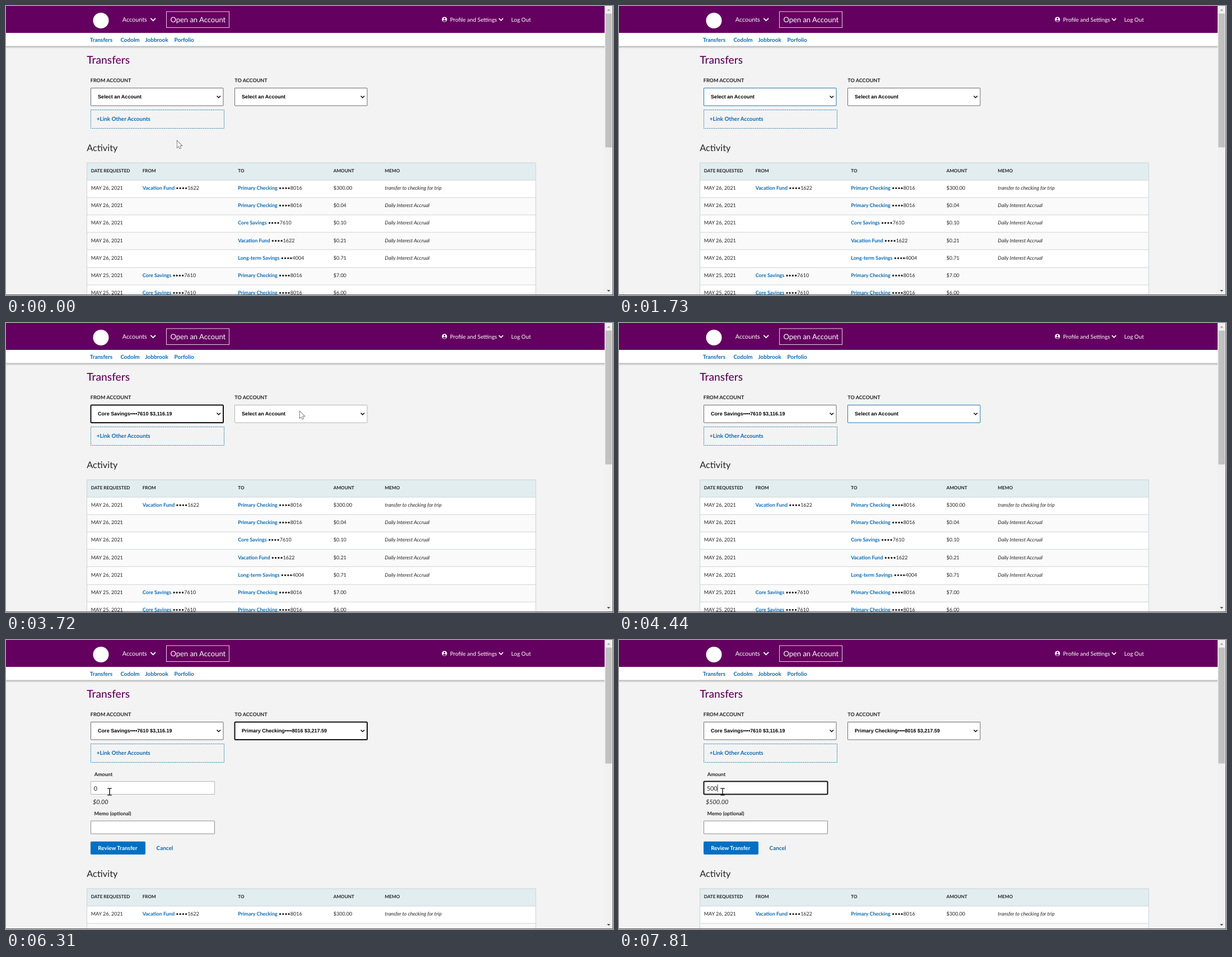
These frames come from a looping animation (1084x516 px, 8000 ms). An HTML page with a canvas:

```html
<!DOCTYPE html>
<html lang="en">
<head>
<meta charset="utf-8">
<title>Transfers</title>
<style>
html, body { margin: 0; width: 100%; height: 100%; overflow: hidden; background: #f3f3f3; }
canvas { display: block; }
</style>
</head>
<body>
<canvas id="stage" width="1084" height="516"></canvas>
<script>
const ctx = document.getElementById('stage').getContext('2d');
const W = 1084, H = 516, LOOP = 8000;
const REM = 16 * W / 1920;
const PURPLE = '#64005f', LINK = '#0a69b3', INK = '#222';
const LATO = 'Lato, sans-serif', ARIAL = '"Liberation Sans", Arial, sans-serif';

const FROM = { x: 151.5, y: 146.5, w: 236.5, h: 31.5 };
const TO = { ...FROM, x: 408.5 };
const AMOUNT = { x: 151.5, y: 252.5, w: 221, h: 23 };
const MEMO = { ...AMOUNT, y: 323 };

const VACATION = ['Vacation Fund', '1622'];
const CHECKING = ['Primary Checking', '8016'];
const CORE = ['Core Savings', '7610'];
const LONG = ['Long-term Savings', '4004'];
const INTEREST = 'Daily Interest Accrual';
const ROWS = [
  [26, VACATION, CHECKING, '$300.00', 'transfer to checking for trip'],
  [26, null, CHECKING, '$0.04', INTEREST],
  [26, null, CORE, '$0.10', INTEREST],
  [26, null, VACATION, '$0.21', INTEREST],
  [26, null, LONG, '$0.71', INTEREST],
  [25, CORE, CHECKING, '$7.00', ''],
  [25, CORE, CHECKING, '$6.00', '']
];
const COLS = [151.7, 243.7, 414.2, 584.8, 676.6];
const HEADS = ['DATE REQUESTED', 'FROM', 'TO', 'AMOUNT', 'MEMO'];

// Draws text with a size in rem and returns its width.
function text(str, x, y, size = 1, color = INK, style = '', family = LATO) {
  ctx.font = `${style} ${size * REM}px ${family}`;
  ctx.fillStyle = color;
  ctx.fillText(str, x, y);
  return ctx.measureText(str).width;
}

function rect(x, y, w, h, color) {
  ctx.fillStyle = color;
  ctx.fillRect(x, y, w, h);
}

function line(points, color, width = 1, close = false) {
  ctx.beginPath();
  points.forEach(([x, y]) => ctx.lineTo(x, y));
  if (close) ctx.closePath();
  ctx.strokeStyle = color;
  ctx.lineWidth = width;
  ctx.stroke();
}

function disc(x, y, r, color) {
  ctx.beginPath();
  ctx.arc(x, y, r, 0, Math.PI * 2);
  ctx.fillStyle = color;
  ctx.fill();
}

function chevron(x, y, r, color, width) {
  line([[x - r, y - r / 2], [x, y + r / 2], [x + r, y - r / 2]], color, width);
}

const inside = (p, b) => p && p.x >= b.x && p.x <= b.x + b.w && p.y >= b.y && p.y <= b.y + b.h;
const lerp = (a, b, u) => a + (b - a) * u;

function bezier(a, b, c, d, u) {
  const v = 1 - u;
  return v * v * v * a + 3 * v * v * u * b + 3 * v * u * u * c + u * u * u * d;
}

// Progress in n equal jumps, the first at t0 and the last at t1.
function jumps(t, t0, t1, n) {
  if (t < t0) return 0;
  return Math.min(n, Math.floor((t - t0) / (t1 - t0) * (n - 1) + 1e-6) + 1) / n;
}

function pointer(t) {
  if (t < 1730) {
    const u = jumps(t, 670, 870, 3);
    return { x: lerp(305, 330, u), y: lerp(240, 167, u) };
  }
  if (t < 3070) return null;
  if (t < 4440) {
    const u = jumps(t, 3280, 3720, 5);
    return { x: lerp(303, 524, u), y: lerp(237.5, 157, u) };
  }
  if (t < 5270) return null;
  const u = jumps(t, 5810, 6310, 6);
  return { x: bezier(519.5, 400, -20, 185, u), y: bezier(220.5, 300, 440, 271, u) };
}

function field(box, state, idle) {
  rect(box.x, box.y, box.w, box.h, '#fff');
  ctx.strokeStyle = { focus: '#101010', active: '#2479ab', hover: '#b4b4b4' }[state] || idle;
  ctx.lineWidth = state === 'focus' ? 2 : 1;
  ctx.beginPath();
  ctx.roundRect(box.x, box.y, box.w, box.h, state === 'focus' ? 1.5 : 0.5);
  ctx.stroke();
}

function select(box, label, state) {
  field(box, state, '#6c6c6c');
  text(label, box.x + 12.6, 165.3, 1, '#000', 'bold', ARIAL);
  chevron(box.x + 228.3, 162.2, 3.2, '#111', 1.5);
}

function header() {
  const shade = ctx.createLinearGradient(0, 71, 0, 76);
  shade.addColorStop(0, 'rgba(0,0,0,.3)');
  shade.addColorStop(1, 'rgba(0,0,0,0)');
  rect(0, 71, 1069, 5, shade);
  rect(0, 48, 1069, 23.5, '#fff');
  rect(0, 0, 1069, 48, PURPLE);

  disc(169.5, 26, 14, '#fff');
  text('Accounts', 207.7, 27.7, 1.2, '#fff');
  chevron(262.7, 24, 4.4, '#fff', 1.8);
  ctx.strokeStyle = '#e6d5e5';
  ctx.lineWidth = 1;
  ctx.strokeRect(286.5, 10, 112, 28.5);
  text('Open an Account', 293.4, 28.6, 1.44, '#fff');

  disc(783, 24, 4.6, '#fff');
  disc(783, 22.5, 1.5, PURPLE);
  ctx.beginPath();
  ctx.ellipse(783, 26.4, 2.7, 1.3, 0, 0, Math.PI * 2);
  ctx.fill();
  text('Profile and Settings', 792.9, 27.5, 1.1, '#fff');
  chevron(884, 24, 3.7, '#fff', 1.6);
  text('Log Out', 902.3, 27.5, 1.1, '#fff');

  [['Transfers', 149.8], ['Codolm', 204.4], ['Jobbrook', 248.5], ['Porfolio', 300.6]]
    .forEach(([s, x]) => text(s, x, 64.4, 1.1, LINK, 'bold'));
}

function account(acc, x, y) {
  if (!acc) return;
  const w = text(acc[0] + ' ', x, y, 1, LINK, 'bold');
  text('••••' + acc[1], x + w, y);
}

function activity(dy) {
  ctx.save();
  ctx.translate(0, dy);
  text('Activity', 144.3, 258.8, 1.8);
  rect(144.5, 280, 801.5, 31, '#e2edf0');
  HEADS.forEach((s, i) => text(s, COLS[i], 296.8, 0.9, INK, 'bold'));
  ROWS.forEach(([day, from, to, sum, memo], i) => {
    const top = 311 + 31.1 * i, y = top + 17.2;
    rect(144.5, top, 801.5, 31.1, i % 2 ? '#fafafa' : '#fff');
    rect(144.5, Math.round(top) - 0.5, 801.5, 1, '#d0d4d5');
    text(`MAY ${day}, 2021`, COLS[0], y);
    account(from, COLS[1], y);
    account(to, COLS[2], y);
    text(sum, COLS[3], y);
    text(memo, COLS[4], y, 1, INK, 'italic');
  });
  ctx.strokeStyle = '#cbd2d4';
  ctx.lineWidth = 1;
  ctx.strokeRect(144.5, 280, 801.5, 300);
  ctx.restore();
}

function form(t, p) {
  const value = t < 7170 ? '0' : t < 7380 ? '' : t < 7490 ? '5' : t < 7810 ? '50' : '500';
  const focused = t >= 6520;
  text('Amount', 157.8, 242.6, 1, INK, 'bold');
  field(AMOUNT, focused ? 'focus' : inside(p, AMOUNT) && 'hover', '#8c8c8c');
  const w = text(value, 156.8, 268.5, 1.2);
  if (focused) rect(156.8 + w, 258, 0.8, 13, '#111');
  text(`$${value || 0}.00`, 155, 293.1, 1.2, INK, 'italic');
  text('Memo (optional)', 157.6, 313, 1, INK, 'bold');
  field(MEMO, inside(p, MEMO) && 'hover', '#8c8c8c');

  ctx.beginPath();
  ctx.roundRect(151, 359.7, 98, 23.3, 2);
  ctx.fillStyle = '#0070c4';
  ctx.fill();
  text('Review Transfer', 164.3, 375, 1.1, '#fff', 'bold');
  text('Cancel', 268.6, 375, 1.1, LINK, 'bold');
}

function scrollbar(end) {
  rect(1069, 0, 15, H, '#f1f1f1');
  rect(1070.3, 13.5, 11.7, end - 13.5, '#c1c1c1');
  const arrow = (y, d, color) => {
    ctx.beginPath();
    [[-3, 0], [3, 0], [0, d]].forEach(([dx, dy]) => ctx.lineTo(1076.2 + dx, y + dy));
    ctx.fillStyle = color;
    ctx.fill();
  };
  arrow(8.5, -3.2, '#a3a3a3');
  arrow(507, 3.2, '#505050');
  rect(1083, 0, 1, H, '#6b6b6b');
  rect(0, 515, W, 1, '#5a5a5a');
}

function cursor(p, open) {
  if (!p) return;
  ctx.save();
  ctx.translate(p.x, p.y);
  if (open && (inside(p, AMOUNT) || inside(p, MEMO))) {
    line([[0, -5.5], [0, 5.5]], '#000', 1.3);
    for (const y of [-6, 6]) line([[-3.8, y], [3.8, y]], '#000', 1.2);
  } else {
    const shape = [[0.5, 0.5], [0.5, 12.8], [3.3, 10.2], [5.2, 14.5], [7.2, 13.6], [5.3, 9.5], [9.2, 9.3]];
    line(shape, '#222', 1.1, true);
    ctx.fillStyle = '#fff';
    ctx.fill();
  }
  ctx.restore();
}

function draw(t) {
  const p = pointer(t), open = t >= 5270;
  const fromState = t < 1300 ? inside(p, FROM) && 'hover'
    : t < 3070 ? 'active' : t < 4030 ? 'focus' : '';
  const toState = t < 4030 ? inside(p, TO) && 'hover'
    : t < 5270 ? 'active' : t < 6520 ? 'focus' : '';

  rect(0, 0, W, H, '#f3f3f3');
  header();
  text('Transfers', 144.3, 102.8, 2.125, PURPLE, '500');
  text('FROM ACCOUNT', 150.8, 136, 1, INK, 'bold');
  text('TO ACCOUNT', 408.3, 136, 1, INK, 'bold');
  select(FROM, t < 3070 ? 'Select an Account' : 'Core Savings••••7610 $3,116.19', fromState);
  select(TO, open ? 'Primary Checking••••8016 $3,217.59' : 'Select an Account', toState);

  ctx.setLineDash([2, 1.3]);
  ctx.strokeStyle = '#2a7cab';
  ctx.lineWidth = 1;
  ctx.strokeRect(151.5, 185.5, 238, 33);
  ctx.setLineDash([]);
  text('+Link Other Accounts', 161.8, 205.3, 1.1, LINK, 'bold');

  if (open) form(t, p);
  activity(open ? 164 : 0);
  scrollbar(open ? 220.5 : 252.5);
  cursor(p, open);
}

ctx.textRendering = 'geometricPrecision';
const start = performance.now();
function tick() {
  draw((performance.now() - start) % LOOP);
  requestAnimationFrame(tick);
}
tick();
</script>
</body>
</html>
```
